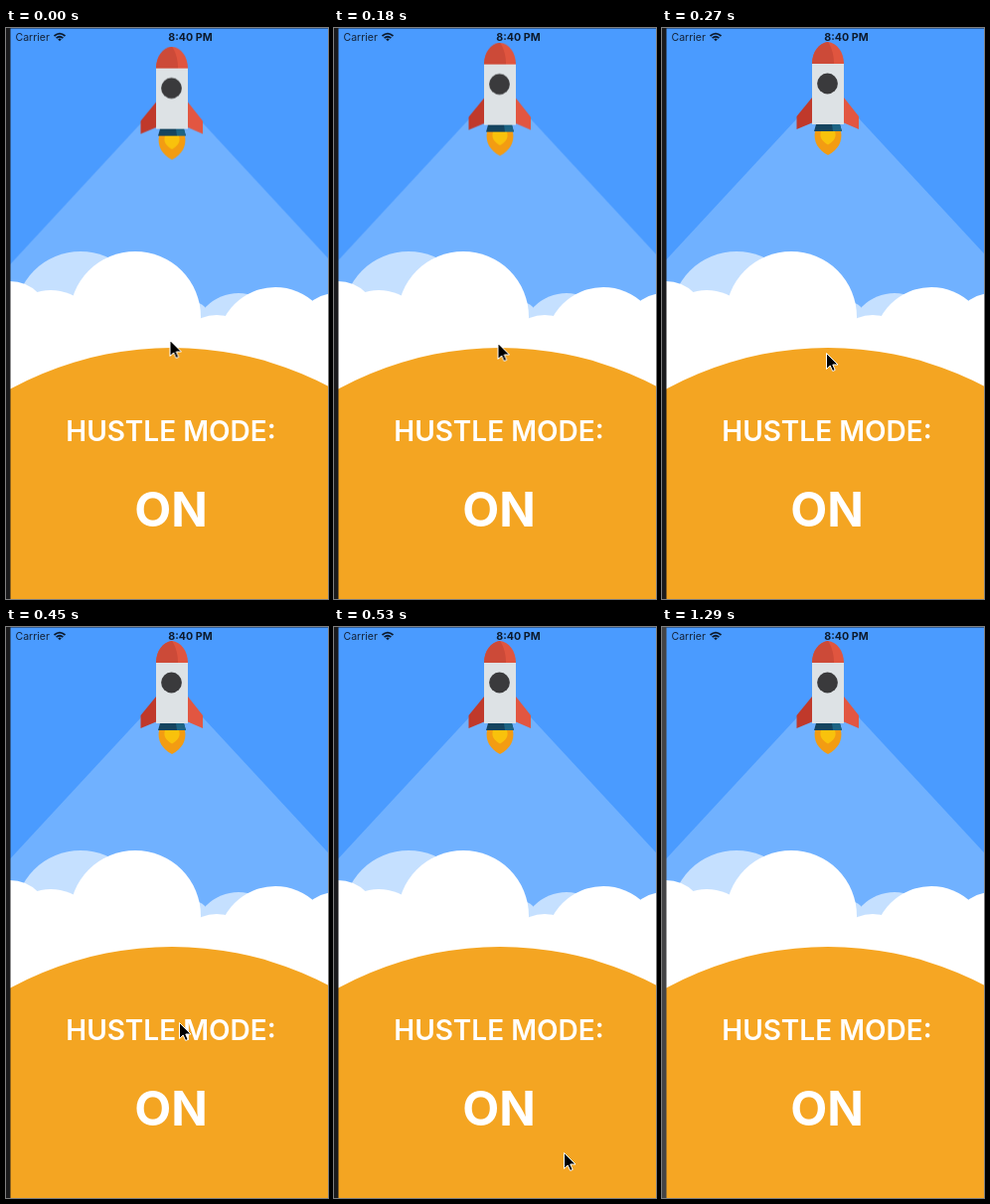
An HTML page for the animation above (1.39 s loop, 324 by 575 pixels).

```html
<!DOCTYPE html>
<html lang="en">
<head>
<meta charset="utf-8">
<title>Hustle mode</title>
<style>
html, body { margin: 0; width: 100%; height: 100%; overflow: hidden; background: #4a9bff; }
svg { display: block; width: 324px; height: 575px; }
text { font-family: Inter, "Liberation Sans", sans-serif; }
.big { fill: #fff; text-anchor: middle; }
</style>
</head>
<body>
<svg viewBox="0 0 324 575">
  <rect width="324" height="575" fill="#4a9bff"/>
  <rect width="324" height="1" fill="#2f5f9c"/>

  <g id="ship">
    <path d="M167 57.5L-13 252V400H347V252Z" fill="#70b1ff"/>
    <path d="M154 104H180C182 114 177 123 167 128C157 123 152 114 154 104Z" fill="#f39c12"/>
    <path d="M160 104H174C176 110 173 114 167 117.500C161 114 158 110 160 104Z" fill="#f9c20c"/>
    <path d="M155 97H179L181 104H153Z" fill="#15445f"/>
    <path d="M171 97H179L181 104H172Z" fill="#1d6484"/>
    <path d="M151 70L135.500 89V102L151 95.500Z" fill="#c0392b"/>
    <path d="M183 70L198 89V102L183 95.500Z" fill="#e25641"/>
    <rect x="151" y="36" width="32" height="61" fill="#dde2e5"/>
    <path d="M151 36C151 24 158 15 167 14C176 15 183 24 183 36Z" fill="#e0553f"/>
    <path d="M151 36C151 24 158 15 167 14C171 20 173 28 173 36Z" fill="#cc4a38"/>
    <circle cx="166.500" cy="56" r="10.400" fill="#3a3a3c"/>
  </g>

  <g fill="#c5e0ff">
    <circle cx="75" cy="291" r="66"/>
    <circle cx="190" cy="290" r="13.500"/>
    <circle cx="234" cy="313" r="46"/>
  </g>
  <g fill="#fff">
    <circle cx="4" cy="295" r="40"/>
    <circle cx="45" cy="314" r="50"/>
    <circle cx="130" cy="291" r="66"/>
    <circle cx="212" cy="329" r="40"/>
    <circle cx="271" cy="319" r="58"/>
    <circle cx="332" cy="307" r="40"/>
    <rect y="300" width="324" height="110"/>
  </g>
  <circle id="hill" cx="167" cy="662" r="340" fill="#f4a522"/>

  <text class="big" x="166" y="415.500" font-size="28" font-weight="600">HUSTLE MODE:</text>
  <text class="big" x="166" y="502" font-size="48" font-weight="700">ON</text>

  <text x="9.500" y="13" font-size="10.500" fill="#14233a">Carrier</text>
  <text x="185.500" y="13" font-size="10.700" font-weight="700" text-anchor="middle" fill="#0d1a2c">8:40 PM</text>
  <g fill="none" stroke="#0d1a2c" stroke-width="1.700">
    <path d="M48.500 8Q54 3.200 59.500 8"/>
    <path d="M50.600 10.200Q54 7.300 57.400 10.200"/>
    <path d="M52.200 11.300Q54 9.800 55.800 11.300L54 13.200Z" fill="#0d1a2c" stroke="none"/>
  </g>

  <rect id="edge" width="4.500" height="575" fill="#1a1a1c"/>
  <path id="arrow" d="M.5.5V16.500L4.200 13L6.700 18.500L9.200 17.400L6.800 12H12Z" fill="#000" stroke="#fff" stroke-width="1" stroke-linejoin="round"/>
</svg>
<script>
const LOOP = 1390;

// Each step is [start in ms, styles]; it holds until the next one.
function hold(id, steps) {
  const frames = steps.map(([t, style]) => ({ offset: t / LOOP, easing: "step-end", ...style }));
  frames.push({ ...steps[steps.length - 1][1], offset: 1 });
  document.getElementById(id).animate(frames, { duration: LOOP, iterations: Infinity });
}

const move = (x, y) => ({ transform: `translate(${x}px, ${y}px)` });
const at = (x, y) => ({ ...move(x, y), opacity: 1 });

hold("ship", [[0, move(0, 4.6)], [90, move(0, 2)], [180, move(0, 0.6)], [270, move(0, 0)]]);

hold("arrow", [
  [0, at(164.5, 314)],
  [180, at(164.5, 317)],
  [270, at(165, 327)],
  [360, at(167, 354)],
  [450, at(174, 398)],
  [530, at(231, 529)],
  [620, { ...move(231, 529), opacity: 0 }]
]);

hold("edge", [[0, { fill: "#1a1a1c" }], [1290, { fill: "#444446" }]]);
hold("hill", [[0, { fill: "#f4a522" }], [1290, { fill: "#f6a623" }]]);
</script>
</body>
</html>
```
